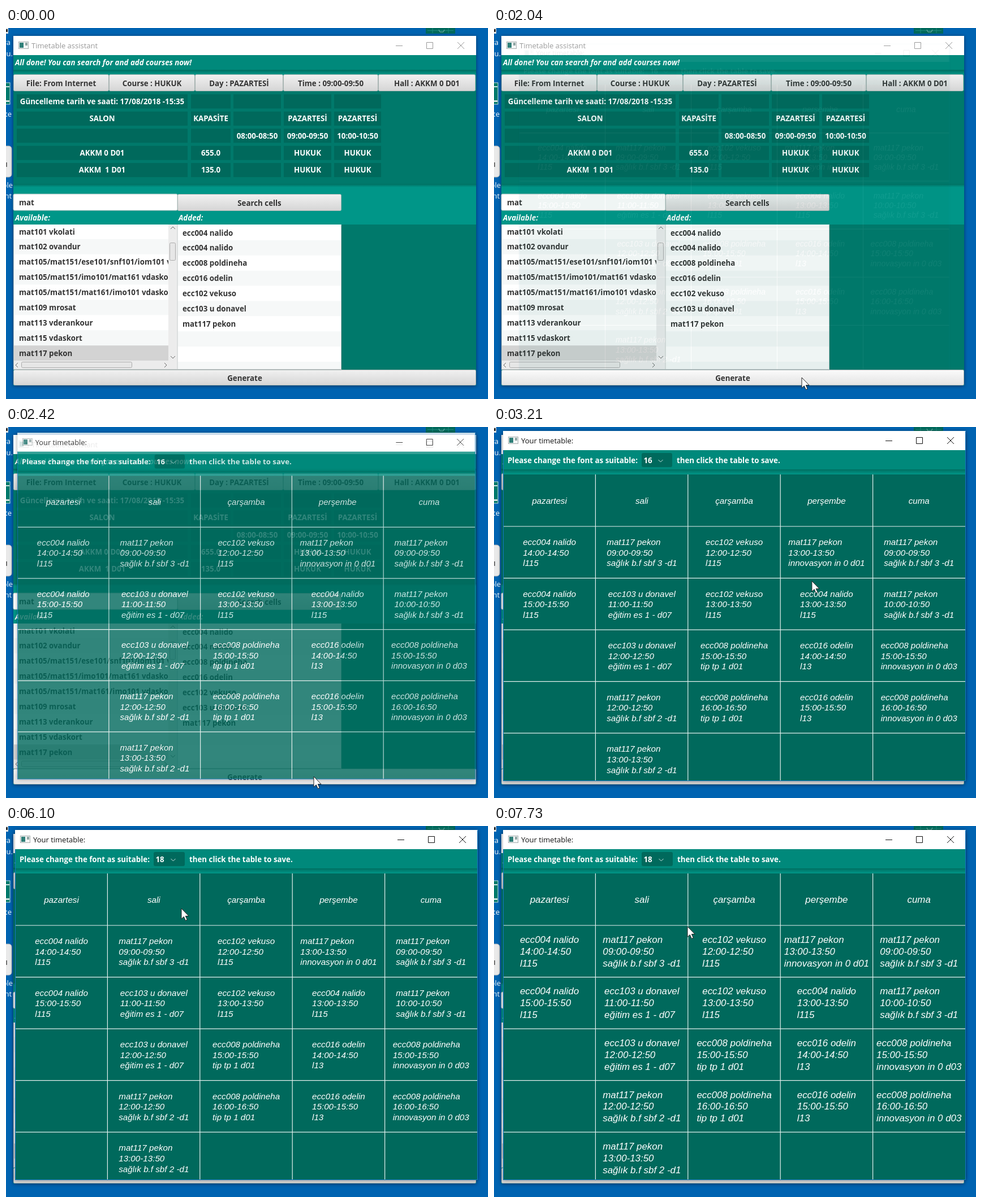
Recreate the animation shown at these times as an HTML page. Size 852 px wide and 657 px high, loop 8000 ms.

```html
<!DOCTYPE html>
<html lang="en">
<head>
<meta charset="utf-8">
<title>Timetable assistant</title>
<style>
html, body { margin: 0; width: 100%; height: 100%; overflow: hidden; background: #0063b1; }
svg { display: block; width: 852px; height: 657px; }
text { white-space: pre; font: 700 13.3px "Open Sans", "Noto Sans", sans-serif; fill: #333; }
.mid { text-anchor: middle; }
.light { fill: #fff; }
.slant { font-style: italic; }
.plain { font-weight: 400; font-size: 13px; }
.cell { font: italic 400 15.2px "Liberation Sans", Arial, sans-serif; fill: #fff; }
.big .cell { font-size: 16.9px; }
.shade { filter: drop-shadow(0 1px 3px rgba(0, 0, 0, .45)); }
.popshade { filter: drop-shadow(0 0 5px rgba(0, 0, 0, .5)); }
</style>
</head>
<body>
<svg id="stage" viewBox="0 0 852 657" xmlns="http://www.w3.org/2000/svg">
  <defs>
    <linearGradient id="btn" x2="0" y2="1"><stop stop-color="#f1f1f1"/><stop offset="1" stop-color="#d5d5d5"/></linearGradient>
    <linearGradient id="hot" x2="0" y2="1"><stop stop-color="#fbfbfb"/><stop offset="1" stop-color="#e3e3e3"/></linearGradient>
    <linearGradient id="fall" x2="0" y2="1"><stop stop-color="#004d40" stop-opacity=".55"/><stop offset="1" stop-color="#004d40" stop-opacity="0"/></linearGradient>
    <clipPath id="listClip"><rect x="13" y="348" width="274" height="241"/></clipPath>
    <clipPath id="rightClip"><rect x="304" y="348" width="288" height="256"/></clipPath>
  </defs>
</svg>
<script>
const LOOP = 8000;
const stage = document.getElementById('stage');
const $ = id => document.getElementById(id);

const rect = (x, y, w, h, fill, more = '') =>
  `<rect x="${x}" y="${y}" width="${w}" height="${h}" fill="${fill}" ${more}/>`;
const text = (x, y, s, cls = '', more = '') =>
  `<text x="${x}" y="${y}" class="${cls}" ${more}>${s}</text>`;
const path = (d, stroke, width = 1, more = '') =>
  `<path d="${d}" fill="none" stroke="${stroke}" stroke-width="${width}" ${more}/>`;
const button = (x, y, w, h, label, id = '') =>
  rect(x + .5, y + .5, w - 1, h - 1, 'url(#btn)', `rx="2" stroke="#a9b5b3" ${id && `id="${id}"`}`) +
  text(x + w / 2, y + h / 2 + 5.5, label, 'mid');

// Window frame: shadow, title bar, icon and the three window buttons
function frame(x, y, title, ink, body) {
  const b = y + 17;
  return rect(x, y, 818, 619, body, 'class="shade"') +
    rect(x, y, 818, 34, '#fff') +
    rect(x + 9.5, y + 10.5, 17, 12, '#f4f6f6', 'stroke="#a5adad"') +
    rect(x + 11, y + 12, 7, 9, '#2f7f78') + rect(x + 21, y + 12, 4, 5, '#8fa5a3') +
    text(x + 32, y + 22, title, 'plain', `style="fill:${ink}"`) +
    path(`M${x + 676} ${b + .5}h12M${x + 730.5} ${b - 5.5}h11v11h-11z` +
      `M${x + 785} ${b - 6}l12 12m0 -12l-12 12`, ink);
}

function desktop() {
  return rect(0, 0, 852, 657, '#0063b1') +
    rect(742, 0, 52, 10, '#00695c') + path('M745 4.5h46M754 0v9M782 0v9', '#1d8a7c') +
    path('M765 3l2 4h6l2 -4', '#7fb5ae') +
    rect(0, 0, 4, 10, '#e8e8e8') + rect(0, 2, 3, 5, '#333') +
    text(8, 30, 'wa', 'plain light', 'text-anchor="end"') +
    text(12, 50, '\'u.', 'plain light', 'text-anchor="end"') +
    rect(-2, 97, 9, 38, '#00796b', 'stroke="#cfe3e0"') + rect(0, 103, 6, 2, '#cfe3e0') + rect(0, 128, 6, 3, '#cfe3e0') +
    text(10, 157, 'te', 'plain light', 'text-anchor="end"') +
    rect(-20, 209, 30, 55, '#e9e9e9', 'rx="5" stroke="#bbb"') + rect(0, 238, 2, 8, '#777') +
    text(12, 283, 'ble', 'plain light', 'text-anchor="end"') +
    text(10, 302, 'nt', 'plain light', 'text-anchor="end"');
}

const HALLS = [
  ['Güncelleme tarih ve saati: 17/08/2018 -15:35', '', '', '', ''],
  ['SALON', 'KAPASİTE', '', 'PAZARTESİ', 'PAZARTESİ'],
  ['', '', '08:00-08:50', '09:00-09:50', '10:00-10:50'],
  ['AKKM 0 D01', '655.0', '', 'HUKUK', 'HUKUK'],
  ['AKKM  1 D01', '135.0', '', 'HUKUK', 'HUKUK']
];
const HALL_COLS = [[19, 302], [327, 70], [402, 84], [491, 84], [580, 83]];
const FILTERS = [
  [13, 169, 'File: From Internet'], [182, 152, 'Course : HUKUK'], [334, 156, 'Day : PAZARTESİ'],
  [490, 168, 'Time : 09:00-09:50'], [658, 172, 'Hall : AKKM 0 D01']
];
const AVAILABLE = [
  'mat101 vkolati', 'mat102 ovandur', 'mat105/mat151/ese101/snf101/iom101 vdaskort',
  'mat105/mat151/imo101/mat161 vdaskort', 'mat105/mat151/mat161/imo101 vdaskort',
  'mat109 mrosat', 'mat113 vderankour', 'mat115 vdaskort', 'mat117 pekon'
];
const ADDED = [
  'ecc004 nalido', 'ecc004 nalido', 'ecc008 poldineha', 'ecc016 odelin',
  'ecc102 vekuso', 'ecc103 u donavel', 'mat117 pekon', '', '', ''
];

function rows(items, x, y, w, picked) {
  return items.map((s, i) => {
    const top = y + i * 26.9;
    const fill = i === picked ? '#d3d3d3' : i % 2 ? '#f6f8f8' : '#fff';
    return rect(x, top, w, 27, fill) + text(x + 9, top + 18.5, s);
  }).join('');
}

function mainWindow() {
  let s = frame(13, 14, 'Timetable assistant', '#999', '#009688');
  s += rect(13, 48, 818, 26, '#00897b') + rect(13, 74, 818, 8, 'url(#fall)') +
    text(16, 66, 'All done! You can search for and add courses now!', 'light slant');
  s += rect(13, 111, 818, 165, '#00796b') + rect(13, 276, 818, 6, 'url(#fall)');
  s += FILTERS.map(([x, w, label]) => button(x, 82, w, 30, label)).join('');
  HALLS.forEach((row, r) => row.forEach((label, c) => {
    const [x, w] = HALL_COLS[c], y = 117.5 + r * 30.4;
    s += rect(x, y, w, 25, '#00695c') + text(x + w / 2, y + 17.3, label, 'mid light');
  }));
  s += rect(13, 294, 290, 29, '#fff', 'rx="2" stroke="#b4c4c2"') + text(23, 314, 'mat') +
    button(303, 294, 290, 30, 'Search cells') +
    text(16, 341, 'Available:', 'light slant') + text(305, 341, 'Added:', 'light slant');
  s += rect(593, 348, 238, 257, '#00796b') + rect(13, 348, 580, 257, '#fff');
  s += `<g clip-path="url(#listClip)">${rows(AVAILABLE, 14, 347, 273, 8)}</g>` +
    `<g clip-path="url(#rightClip)">${rows(ADDED, 303, 349, 289, -1)}</g>`;
  s += rect(287, 348, 15, 256, '#ececec') + rect(13, 589, 289, 15, '#ececec') +
    rect(289.5, 380.5, 10, 31, '#e6e6e6', 'rx="2" stroke="#ababab"') +
    rect(27.5, 591.5, 195, 10, '#e6e6e6', 'rx="2" stroke="#ababab"') +
    path('M291 356l4 -4l4 4M291 581l4 4l4 -4M21 593l-4 4l4 4M280 593l4 4l-4 4', '#666') +
    path('M13.5 348v256.5h579v-256M303 348v256', '#b9bfbf');
  return s + button(13, 605, 818, 28, 'Generate', 'gen');
}

const DAYS = ['pazartesi', 'sali', 'çarşamba', 'perşembe', 'cuma'];
const MAT = 'mat117 pekon', E4 = 'ecc004 nalido', E8 = 'ecc008 poldineha', E16 = 'ecc016 odelin',
  E102 = 'ecc102 vekuso', E103 = 'ecc103 u donavel',
  SBF2 = 'sağlık b.f sbf 2 -d1', SBF3 = 'sağlık b.f sbf 3 -d1', EDU = 'eğitim es 1 - d07',
  TIP = 'tip tp 1 d01', INN = 'innovasyon in 0 d0';
const WEEK = [
  [[E4, 14, 'l115'], [E4, 15, 'l115']],
  [[MAT, '09', SBF3], [E103, 11, EDU], [E103, 12, EDU], [MAT, 12, SBF2], [MAT, 13, SBF2]],
  [[E102, 12, 'l115'], [E102, 13, 'l115'], [E8, 15, TIP], [E8, 16, TIP]],
  [[MAT, 13, INN + 1], [E4, 13, 'l115'], [E16, 14, 'l13'], [E16, 15, 'l13']],
  [[MAT, '09', SBF3], [MAT, 10, SBF3], [E8, 15, INN + 3], [E8, 16, INN + 3]]
];
const pen = document.createElement('canvas').getContext('2d');

function table(size, pitch) {
  pen.font = `italic ${size}px "Liberation Sans", Arial, sans-serif`;
  return WEEK.map((day, c) => {
    const cx = 98 + c * 163.3;
    return text(cx, 136, DAYS[c], 'cell mid') + day.map(([course, h, place], r) => {
      const lines = [course, `${h}:00-${h}:50`, place];
      const x = cx - Math.max(...lines.map(l => pen.measureText(l).width)) / 2;
      const y = 227.6 + r * 91.6;
      return lines.map((l, i) => text(x, y + (i - 1) * pitch, l, 'cell')).join('');
    }).join('');
  }).join('');
}

function picker(value, w) {
  return rect(261, 46, w, 25, '#00695c', 'rx="3"') + text(264.5, 63.5, value, 'light') +
    path(`M${w + 236.5} 58l4 4l4 -4`, '#cfe3e0') +
    text(w + 269, 63.5, 'then click the table to save.', 'light');
}

function timetable() {
  let grid = '';
  for (let i = 0; i < 5; i++) grid += `M16 ${176 + i * 91.55}h818`;
  for (let i = 1; i < 5; i++) grid += `M${16 + i * 163.4} 84v543`;
  return frame(16, 7, 'Your timetable:', '#111', '#009688') +
    rect(16, 41, 818, 34, '#00897b') + rect(16, 75, 818, 9, 'url(#fall)') +
    text(24, 63.5, 'Please change the font as suitable:', 'light') +
    `<g id="pick16">${picker(16, 54)}</g><g id="pick18">${picker(18, 55)}</g>` +
    rect(16, 84, 818, 543, '#00695c') + path(grid, '#e4efed', 1.2) +
    `<g id="small">${table(15.2, 18.6)}</g><g id="large" class="big">${table(16.9, 20.9)}</g>` +
    path('M16.5 41v585.5h817v-619', '#1579c4', 1);
}

const ROW = 29.25;
function popup() {
  let s = rect(264.5, -20, 54, 700, '#fff', 'class="popshade" stroke="#b5b5b5"') +
    rect(265, 43.5, 53, ROW, '#0096c9', 'id="bar"');
  for (let i = 0; i < 23; i++)
    s += text(297, 5 + i * ROW, 8 + 2 * i, 'mid item');
  return s + path('M273 118l4 4l6 -10', '#444', 2.2);
}

stage.insertAdjacentHTML('beforeend',
  desktop() + mainWindow() +
  `<g id="win">${timetable()}</g><g id="menu">${popup()}</g>` +
  '<path id="cursor" d="M0 0V18.5L4.3 14.6L7.3 21.4L10.3 20.1L7.3 13.5H13Z" fill="#fff" stroke="#222" stroke-width="1"/>');

// Screen updates: first time, last time, number of steps
const UPDATES = [
  [100, 890, 11], [950, 1720, 11], [2040, 2040, 1], [2180, 2510, 5], [2890, 3440, 8],
  [3680, 4010, 5], [4160, 4240, 2], [4390, 4550, 3], [5020, 5550, 8], [6100, 6250, 3],
  [6810, 7570, 11], [7640, 7730, 2]
];
// Pointer: time, x, y
const TRACK = [
  [100, 703, 626], [420, 640, 522], [560, 612, 505], [890, 584, 574], [1027, 575, 592],
  [1300, 555, 611], [1720, 544, 619], [2800, 544, 619], [2890, 547, 596], [3050, 562, 420],
  [3204, 562, 273], [3440, 461, 86], [3600, 461, 86], [4010, 309, 72], [4240, 297, 57],
  [4390, 297, 57], [4550, 300, 58], [4950, 300, 58], [5020, 310, 67], [5550, 310, 146],
  [6100, 310, 146], [6250, 310, 147], [6730, 310, 147], [7115, 284, 76], [7300, 300, 102],
  [7570, 333, 156], [7730, 342, 178]
];
// Window opening: time, opacity, scale
const OPENING = [
  [0, 0, 1], [2040, .06, .93], [2180, .28, .957], [2255, .52, .974],
  [2340, .8, .99], [2425, .95, .997], [2510, 1, 1]
];

function snap(t) {
  let at = 0;
  for (const [a, b, n] of UPDATES) {
    if (t < a) break;
    const step = n > 1 ? (b - a) / (n - 1) : 1;
    at = a + Math.floor((Math.min(t, b) - a) / step + 1e-6) * step;
  }
  return at;
}

function pointer(t) {
  const i = TRACK.findIndex(k => k[0] > t);
  if (i < 0) return TRACK[TRACK.length - 1].slice(1);
  if (i === 0) return TRACK[0].slice(1);
  const [t0, x0, y0] = TRACK[i - 1], [t1, x1, y1] = TRACK[i];
  const p = (t - t0) / (t1 - t0);
  return [x0 + (x1 - x0) * p, y0 + (y1 - y0) * p];
}

const show = (id, on) => $(id).setAttribute('display', on ? 'inline' : 'none');
const items = [...document.querySelectorAll('.item')];

function draw(time) {
  const t = snap(time);
  const [x, y] = pointer(t);
  show('cursor', t >= 100);
  $('cursor').setAttribute('transform', `translate(${x.toFixed(1)} ${y.toFixed(1)})`);
  $('gen').setAttribute('fill', t >= 100 && t < 2890 && y > 604 ? 'url(#hot)' : 'url(#btn)');

  const [, alpha, k] = OPENING.filter(o => o[0] <= t + 1).pop();
  show('win', alpha > 0);
  $('win').setAttribute('opacity', alpha);
  $('win').setAttribute('transform', `translate(425 317) scale(${k}) translate(-425 -317)`);

  const open = t >= 4390 && t < 6100;
  show('menu', open);
  if (open) {
    const row = t < 4460 ? -1 : 2 + Math.floor((y - 43.5) / ROW);
    show('bar', row >= 0);
    $('bar').setAttribute('y', 43.5 + (row - 2) * ROW);
    items.forEach((el, i) => el.classList.toggle('light', i === row));
  }
  show('pick16', t < 6100);
  show('pick18', t >= 6100);
  show('small', t < 6170);
  show('large', t >= 6170);
}

const start = performance.now();
function tick() {
  draw((performance.now() - start) % LOOP);
  requestAnimationFrame(tick);
}
tick();
</script>
</body>
</html>
```
